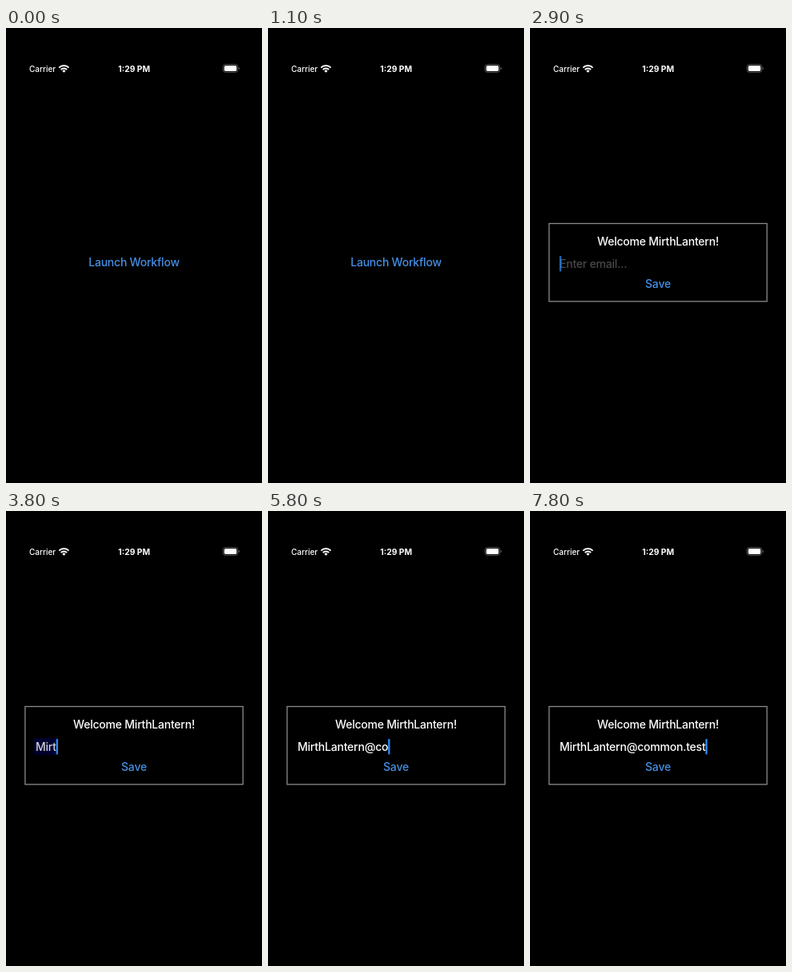
An HTML page for the animation above (8 s loop, 320 by 569 pixels).

```html
<!DOCTYPE html>
<html lang="en">
<head>
<meta charset="utf-8">
<title>Launch Workflow</title>
<style>
  html, body { margin: 0; width: 100%; height: 100%; overflow: hidden; background: #000; }
  svg { display: block; width: 100vw; height: 100vh; }
  text { font: 450 14px Inter, sans-serif; letter-spacing: -.22px; fill: #fff; }
  .mid { text-anchor: middle; }
  .link { fill: #4590e6; }
  .hint { fill: #484848; }
  #carrier { font-size: 10px; font-weight: 500; letter-spacing: 0; }
  #clock { font-size: 10.3px; font-weight: 700; letter-spacing: 0; }
</style>
</head>
<body>
<svg viewBox="0 0 320 569">
  <text id="carrier" x="29" y="54.7">Carrier</text>
  <g fill="none" stroke="#fff" stroke-width="2">
    <path d="M66.3 49.6A8.6 8.6 0 0 1 78.5 49.6"/>
    <path d="M68.7 52A5.2 5.2 0 0 1 76.1 52"/>
    <path d="M72.4 55.8L70.3 53.7A2.9 2.9 0 0 1 74.5 53.7Z" fill="#fff" stroke="none"/>
  </g>
  <text id="clock" class="mid" x="160.2" y="54.8">1:29 PM</text>
  <rect x="271.3" y="45.7" width="18.5" height="9.6" rx="3" fill="none" stroke="#666" stroke-width=".9"/>
  <rect x="272.8" y="47.1" width="15.5" height="6.8" rx="1.7" fill="#fff"/>
  <path d="M290.8 49V52Q291.8 51.5 291.8 50.5T290.8 49Z" fill="#777"/>

  <text id="launch" class="mid link" x="160" y="298.2">Launch Workflow</text>

  <g id="form">
    <rect x="23.9" y="244.5" width="272.3" height="97.4" fill="none" stroke="#8a8a8a" stroke-width="1.3"/>
    <text class="mid" x="160" y="271.6">Welcome MirthLantern!</text>
    <rect id="mark" x="35" y="284" height="21" rx="2" fill="#00002e"/>
    <text id="hint" class="hint" x="37" y="300">Enter email...</text>
    <text id="entry" x="37" y="300"></text>
    <rect id="caret" y="285" width="2.4" height="19.5" rx=".8" fill="#2a86f0"/>
    <text class="mid link" x="160" y="324.7">Save</text>
  </g>

  <g id="touch">
    <circle r="20.2" fill="none" stroke="#8c8c8c" stroke-width="2.6"/>
    <circle r="15.6" fill="#9c9c9c"/>
  </g>
</svg>
<script>
const LOOP = 8000, STEP = 100, LEFT = 37;
const OPEN = 1200, FOCUS = 1900;

// Typing comes in bursts, each with its own even pace.
const BURSTS = [
  { text: 'Mirth', at: 3100, pace: 200 },
  { text: 'Lant', at: 4150, pace: 150 },
  { text: 'ern', at: 4800, pace: 150 },
  { text: '@co', at: 5300, pace: 200 },
  { text: 'mmon', at: 6000, pace: 100 },
  { text: '.test', at: 6500, pace: 100 },
];
const KEYS = BURSTS.flatMap(b => [...b.text].map((char, i) => ({ char, at: b.at + i * b.pace })));

const launchTap = { from: 500, to: 700, x: 160, y: 295 };
const fieldTap = { from: 1800, to: 2100, x: 105.8, y: 294.6 };

const el = id => document.getElementById(id);
const launch = el('launch'), form = el('form'), mark = el('mark'), hint = el('hint');
const entry = el('entry'), caret = el('caret'), touch = el('touch');

const clamp = v => Math.min(1, Math.max(0, v));
const ramp = (t, from, to) => clamp((t - from) / (to - from));
const during = (t, { from, to }) => t >= from && t < to;
const show = (node, on) => node.setAttribute('visibility', on ? 'inherit' : 'hidden');

// The caret stays lit, fades out quickly and returns more slowly.
function blink(idle) {
  const phase = Math.max(0, idle) % 1000;
  return 1 - ramp(phase, 200, 400) + ramp(phase, 500, 900);
}

function draw(ms) {
  const t = Math.floor(ms % LOOP / STEP) * STEP;
  const typed = KEYS.filter(k => k.at <= t);
  const marked = typed.length === 4;

  show(launch, t < OPEN);
  launch.setAttribute('opacity', during(t, launchTap) ? .35 : 1);
  show(form, t >= OPEN);
  show(hint, !typed.length);

  entry.textContent = typed.map(k => k.char).join('');
  entry.style.fill = marked ? '#d0d0dc' : '#fff';
  const width = typed.length ? entry.getComputedTextLength() : 0;
  show(mark, marked);
  mark.setAttribute('width', width + 3);

  const rest = typed.length ? typed[typed.length - 1].at : fieldTap.to;
  caret.setAttribute('x', LEFT + width - .2);
  caret.setAttribute('opacity', t < FOCUS ? 0 : blink(t - rest));

  const tap = [launchTap, fieldTap].find(p => during(t, p));
  show(touch, tap);
  if (tap) touch.setAttribute('transform', `translate(${tap.x} ${tap.y})`);
}

const start = performance.now();
function tick() {
  draw(performance.now() - start);
  requestAnimationFrame(tick);
}
tick();
</script>
</body>
</html>
```
